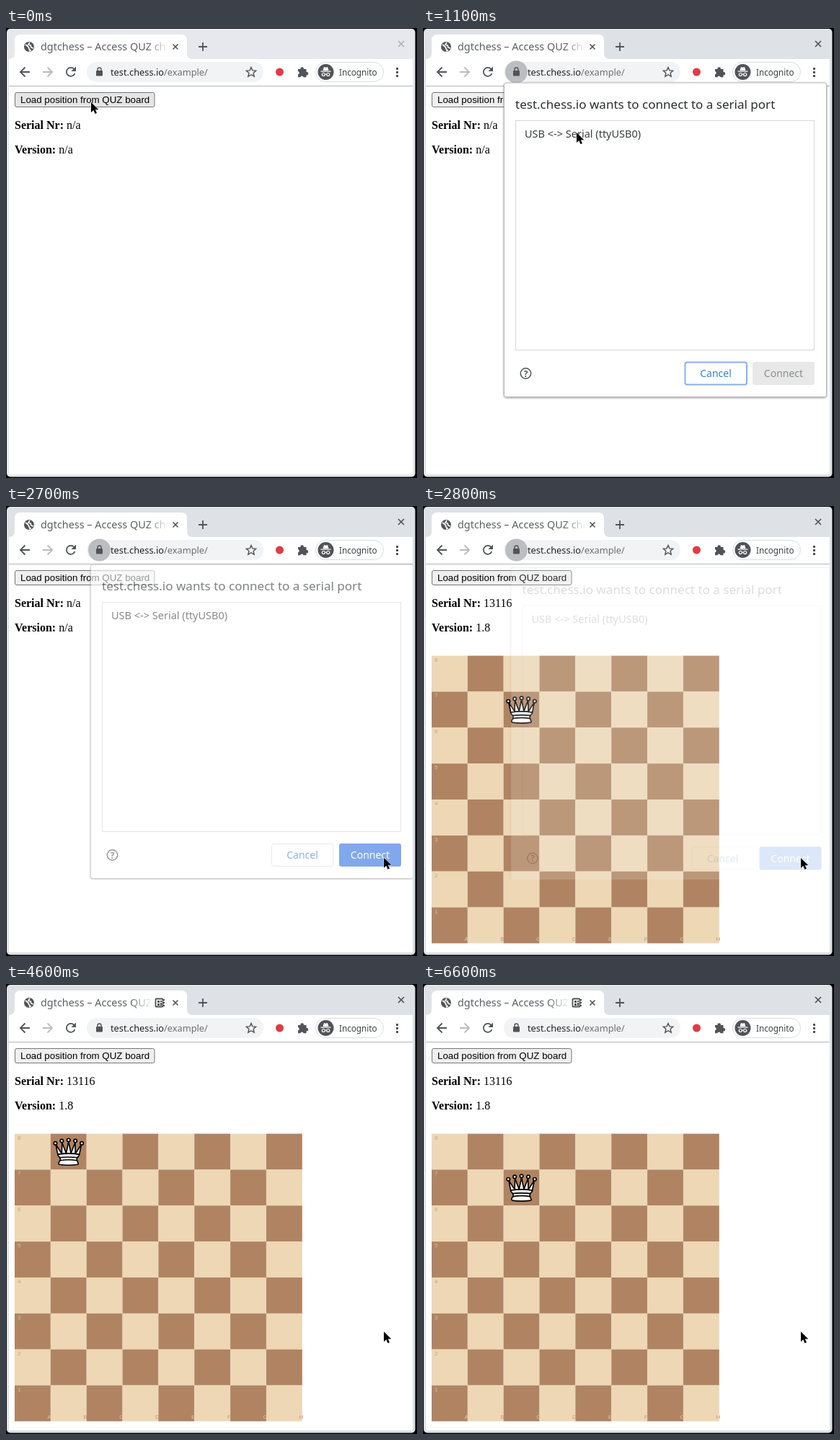
Recreate the animation shown at these times as an HTML page. Size 570 px wide and 624 px high, loop 6800 ms.

```html
<!DOCTYPE html>
<html lang="en">
<head>
<meta charset="utf-8">
<title>Chess board demo</title>
<style>
html, body { margin: 0; width: 100%; height: 100%; overflow: hidden; background: #000; }
svg { display: block; }
text { font-family: "Noto Sans", sans-serif; }
.page { font: 16px "Liberation Serif", serif; }
.arial { font-family: "Liberation Sans", sans-serif; }
.line { fill: none; stroke: #505357; stroke-width: 1.8; }
.dark { fill: #505357; }
</style>
</head>
<body>
<svg width="570" height="624" viewBox="0 0 570 624">
  <defs>
    <linearGradient id="fade" gradientUnits="userSpaceOnUse" y1="0" y2="0">
      <stop stop-color="#5b5e63"/><stop offset="1" stop-color="#5b5e63" stop-opacity="0"/>
    </linearGradient>
    <clipPath id="dialogArea"><path d="M100 70H564V518H100Z"/></clipPath>
    <filter id="shadow" x="-5%" y="-5%" width="110%" height="110%">
      <feDropShadow dx="0" dy="1" stdDeviation="1.6" flood-opacity=".4"/>
    </filter>
  </defs>

  <!-- window and tab strip -->
  <rect id="frame" x="1" y="1" width="566.5" height="621.5" rx="5"/>
  <path d="M4 43Q12 43 12 35V17Q12 9 20 9H243Q251 9 251 17V35Q251 43 259 43H564V619H4Z" fill="#fff"/>
  <path d="M4 80.5H564" stroke="#b4b6b9"/>
  <circle cx="32" cy="26" r="7" class="dark"/>
  <path d="M27 23l4 3 1 3 2 2-2 1M33 20l-2 3 3 1 1 3 3 1" fill="none" stroke="#fff" stroke-width="1.7"/>
  <text x="48" y="31" font-size="14.4" fill="url(#fade)">dgtchess – Access QUZ chess</text>
  <g id="chip">
    <rect x="207.5" y="20.5" width="10" height="11" rx="1" class="line" stroke-width="1.5"/>
    <path d="M210 23h3v3h-3zM210 27h3v3h-3zM214 23h2v2h-2zM214 26h2v4h-2zM218 21h2v2h-2zM218 25h2v2h-2zM218 29h2v2h-2z" class="dark"/>
  </g>
  <path d="M231.5 22.500l7 7M238.500 22.500l-7 7" class="line" style="stroke-width:1.6"/>
  <path d="M273 20v12M267 26h12" class="line"/>
  <path id="close" d="M544 18l8 8M552 18l-8 8" fill="none" stroke-width="1.7"/>

  <!-- toolbar -->
  <path d="M33 61H20.500M26.500 54.500L20 61l6.500 6.500" class="line"/>
  <path d="M51 61H63.500M57.500 54.500L64 61l-6.500 6.500" class="line" style="stroke:#b9bbbe"/>
  <path d="M94.500 57A6 6 0 1 0 95.500 63" class="line"/>
  <path d="M97 53.500v6.500h-6.500z" class="dark"/>
  <rect x="112" y="47" width="245" height="28" rx="14" fill="#f1f3f4"/>
  <circle id="lockGlow" cx="129.500" cy="61" r="15.500" fill="#bbbdc0"/>
  <rect x="125" y="59" width="9" height="7.500" rx="1" class="dark"/>
  <path d="M127 60v-2.500a2.500 2.500 0 0 1 5 0V60" class="line" style="stroke-width:1.4"/>
  <text x="145" y="66" font-size="12.800" fill="#6c7075"><tspan fill="#202124">test.chess.io</tspan>/example/</text>
  <path d="M340 54.500l1.900 4.400 4.800.4-3.600 3.200 1.100 4.700-4.200-2.500-4.200 2.500 1.100-4.700-3.600-3.200 4.800-.4z" class="line" style="stroke-width:1.4"/>
  <circle cx="379.500" cy="61" r="5.500" fill="#e23b45"/>
  <path d="M405 57h3.500a2.200 2.200 0 1 1 4.300 0h3.700v4a2.200 2.200 0 1 1 0 4.300v3h-4a2.200 2.200 0 0 0-4.300 0H405v-4a2.200 2.200 0 0 0 0-4.300z" class="dark"/>
  <rect x="429.500" y="47.500" width="94" height="27" rx="13.500" fill="#fff" stroke="#dadce0"/>
  <circle cx="443.500" cy="61" r="11" class="dark"/>
  <path d="M439.500 59l1.500-5 2.500.7 2.500-.7 1.500 5zM436.500 59.500h14v1.300h-14z" fill="#fff"/>
  <path d="M442.300 64.500a2 2 0 1 1-4 0 2 2 0 0 1 4 0q1.200-1 2.400 0a2 2 0 1 1 4 0 2 2 0 0 1-4 0" fill="none" stroke="#fff" stroke-width="1.200"/>
  <text x="462" y="66" font-size="11.700" fill="#3c4043">Incognito</text>
  <path d="M541 55h3v3h-3zM541 60h3v3h-3zM541 65h3v3h-3z" class="dark"/>

  <!-- page -->
  <rect id="load" x="12.500" y="89.500" width="193.500" height="20" rx="2.500" stroke="#767676"/>
  <text x="20" y="104" class="arial" font-size="13.333">Load position from QUZ board</text>
  <text x="12" y="140" class="page"><tspan font-weight="bold">Serial Nr:</tspan> <tspan id="serial"></tspan></text>
  <text x="12" y="174" class="page"><tspan font-weight="bold">Version:</tspan> <tspan id="version"></tspan></text>
  <g id="board"></g>
  <g id="queen" fill="#fff" stroke="#000" stroke-width="1.500" stroke-linejoin="round" stroke-linecap="round">
    <path d="M9 26c8.500-1.500 21-1.500 27 0l2.500-12.500L31 25l-.3-14.100-5.200 13.600-3-14.500-3 14.500-5.200-13.600L14 25 6.500 13.500z"/>
    <path d="M9 26c0 2 1.500 2 2.500 4 1 1.500 1 1 .5 3.500-1.500 1-1.500 2.500-1.500 2.500-1.500 1.500.5 2.500.5 2.500 6.500 1 16.500 1 23 0 0 0 1.500-1 0-2.500 0 0 .5-1.500-1-2.500-.5-2.500-.5-2 .5-3.500 1-2 2.500-2 2.500-4-8.500-1.500-18.500-1.500-27 0z"/>
    <path d="M11.500 30c3.500-1 18.500-1 22 0M12 33.500c6-1 15-1 21 0" fill="none"/>
    <circle cx="6" cy="12" r="2"/><circle cx="14" cy="9" r="2"/><circle cx="22.500" cy="8" r="2"/>
    <circle cx="31" cy="9" r="2"/><circle cx="39" cy="12" r="2"/>
  </g>

  <!-- port chooser -->
  <g clip-path="url(#dialogArea)">
    <g id="dialog">
      <rect x="112.500" y="76" width="447" height="435.500" rx="3" fill="#fff" stroke="#b5b5b5" filter="url(#shadow)"/>
      <text x="128" y="112" font-size="17.050" fill="#2b2d30">test.chess.io wants to connect to a serial port</text>
      <rect x="128.500" y="128.500" width="414" height="318" fill="#fff" stroke="#d6d6d6"/>
      <rect id="port" x="129" y="128.500" width="413.500" height="36" fill="#c8c8c8" stroke="#8ab2e8"/>
      <text x="141" y="152" font-size="14.500" fill="#3a3c40">USB &lt;-&gt; Serial (ttyUSB0)</text>
      <circle cx="142.500" cy="479" r="7.200" class="line" style="stroke-width:1.500"/>
      <text x="142.500" y="483.500" font-size="12" font-weight="bold" text-anchor="middle" class="dark">?</text>
      <rect id="cancel" x="363.500" y="463.500" width="85.500" height="31" rx="3" fill="#fff"/>
      <text x="406" y="484" font-size="14" text-anchor="middle" fill="#3b7fd4">Cancel</text>
      <rect id="connect" x="457" y="463" width="86" height="32" rx="3"/>
      <text id="connectText" x="500" y="484" font-size="14" text-anchor="middle">Connect</text>
    </g>
  </g>

  <path id="cursor" d="M0 0V14L3.300 11 5.500 16 8 15 5.800 10.200H10.300Z" stroke="#fff" stroke-width="1" paint-order="stroke"/>
</svg>
<script>
const LOOP = 6800, STEP = 100, SIDE = 49.85, LEFT = 12, TOP = 207.6;
const LIGHT = '#edd7b5', DARK = '#b08462';
const $ = id => document.getElementById(id);
const set = (id, attrs) => {
  for (const name in attrs) $(id).setAttribute(name, attrs[name]);
};
const show = (id, on) => set(id, { visibility: on ? 'visible' : 'hidden' });

function drawBoard() {
  const label = (text, x, y, fill) =>
    `<text x="${x}" y="${y}" class="arial" font-size="8" fill="${fill}">${text}</text>`;
  let squares = '', labels = '';
  for (let row = 0; row < 8; row++) {
    for (let col = 0; col < 8; col++) {
      squares += `<rect x="${LEFT + col * SIDE}" y="${TOP + row * SIDE}" width="${SIDE}" height="${SIDE}" fill="${(row + col) % 2 ? DARK : LIGHT}"/>`;
    }
    const odd = row % 2;
    labels += label(8 - row, 16, TOP + row * SIDE + 8, odd ? '#d9bd99' : '#c7a581');
    labels += label('ABCDEFGH'[row], 57.5 + row * SIDE, 603, odd ? '#c19a76' : '#e3c8a4');
  }
  $('board').innerHTML = squares + labels;
}

// Linear path through [time, ...values] keys
function track(keys, t) {
  const i = keys.findIndex(k => k[0] > t);
  if (i < 0) return keys[keys.length - 1].slice(1);
  const a = keys[i - 1], b = keys[i], p = (t - a[0]) / (b[0] - a[0]);
  return a.slice(1).map((v, j) => v + (b[j + 1] - v) * p);
}

const cursorPath = [
  [0, 118, 103], [500, 118, 103], [700, 140, 115], [1000, 208, 143], [1100, 213, 145],
  [1400, 213, 145], [1500, 232, 162], [1700, 400, 335], [1900, 520, 452], [2000, 524, 470],
  [2200, 524, 486], [2800, 524, 488], [3700, 524, 488], [3800, 524, 484],
  [4200, 524, 484], [4300, 524, 482]
];
// Opacity and offset of the chooser
const dialogPath = [
  [0, 0, 6], [200, 0, 6], [300, .35, 6], [500, 1, 0],
  [2600, 1, 0], [2700, .6, 5], [2800, .16, 9.5], [2900, 0, 10]
];
// Queen position as file and row from the top-left square
const queenMoves = [
  [0], [2800, 2, 1], [3800], [4600, 1, 0], [5500], [5700, 1, 1], [6600, 2, 1]
];

function render(now) {
  const t = Math.floor(now % LOOP / STEP) * STEP;
  const active = t >= 200, loaded = t >= 2800, chosen = t >= 1400, chip = t >= 3000;

  set('frame', { fill: active ? '#dee1e6' : '#e7e8ed' });
  set('close', { stroke: active ? '#505357' : '#aeb0b4' });
  set('load', { fill: t < 400 ? '#e5e5e5' : '#efefef' });
  set('fade', { x1: chip ? 172 : 195, x2: chip ? 203 : 225 });
  show('chip', chip);
  show('lockGlow', t >= 300 && t < 3000);
  $('serial').textContent = loaded ? '13116' : 'n/a';
  $('version').textContent = loaded ? '1.8' : 'n/a';
  show('board', loaded);

  const [, file, row] = queenMoves.filter(m => m[0] <= t).pop();
  show('queen', file !== undefined);
  if (file !== undefined) {
    set('queen', { transform: `translate(${LEFT + file * SIDE} ${TOP + row * SIDE}) scale(${SIDE / 45})` });
  }

  const [opacity, shift] = track(dialogPath, t);
  set('dialog', { opacity, transform: `translate(${shift} ${shift})` });
  show('port', chosen && t < 2700);
  set('cancel', { stroke: chosen ? '#dadce0' : '#86b1ea', 'stroke-width': chosen ? 1 : 2 });
  set('connect', { fill: chosen ? '#2f70e0' : '#e8e8e8' });
  set('connectText', { fill: chosen ? '#fff' : '#8b8d90' });

  const [x, y] = track(cursorPath, t);
  set('cursor', { transform: `translate(${x} ${y})` });
}

drawBoard();
const start = performance.now();
function tick() {
  render(performance.now() - start);
  requestAnimationFrame(tick);
}
tick();
</script>
</body>
</html>
```
